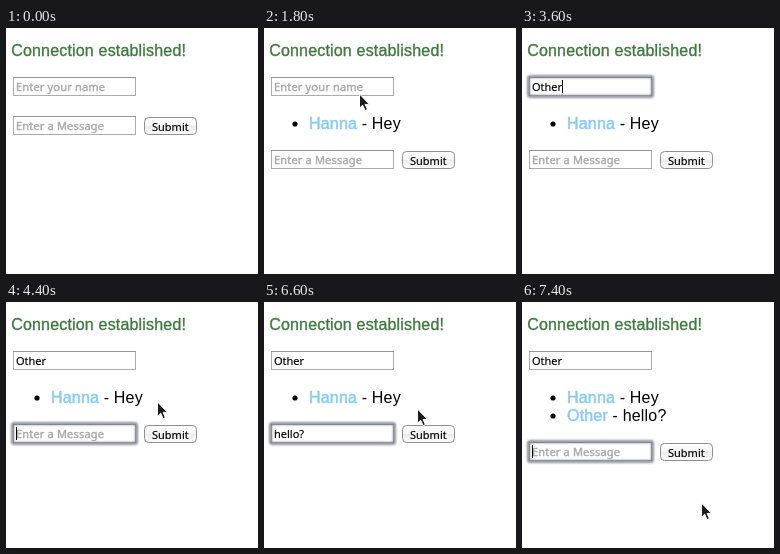
Write an HTML page that moves like this. It is 252 by 246 pixels and loops after 7600 ms.

```html
<!DOCTYPE html>
<html lang="en">
<head>
<meta charset="utf-8">
<title>Chat form</title>
<style>
html, body { margin: 0; width: 100%; height: 100%; overflow: hidden; background: #fff; }
svg { display: block; }
text { white-space: pre; }
.page { font: 16px "Liberation Sans", Arial, sans-serif; letter-spacing: .18px; }
.title { fill: #3f7a3f; stroke: #3f7a3f; stroke-width: .35px; }
.user { fill: #87cbf5; stroke: #87cbf5; stroke-width: .5px; }
.ui { font: 11px "Noto Sans", "Open Sans", sans-serif; stroke: #000; stroke-width: .15px; }
.ui.hint { fill: #a9a9a9; stroke: #a9a9a9; stroke-width: .45px; letter-spacing: .18px; }
.option { font: 13px "Noto Sans", "Open Sans", sans-serif; }
</style>
</head>
<body>
<svg width="252" height="246" viewBox="0 0 252 246">
  <defs>
    <linearGradient id="plain" x2="0" y2="1">
      <stop offset="0" stop-color="#fff"/><stop offset=".5" stop-color="#f4f4f4"/>
      <stop offset=".5" stop-color="#ebebeb"/><stop offset="1" stop-color="#fbfbfb"/>
    </linearGradient>
    <linearGradient id="pressed" x2="0" y2="1">
      <stop offset="0" stop-color="#c3c8d0"/><stop offset="1" stop-color="#969eaa"/>
    </linearGradient>
    <filter id="blur" x="-10%" y="-50%" width="120%" height="200%"><feGaussianBlur stdDeviation=".8"/></filter>
    <g id="field">
      <rect x="7.5" y=".5" width="122" height="18" fill="#fff" stroke="#acacac"/>
      <path d="M7 .5h123" stroke="#969696"/>
    </g>
    <rect id="ring" x="6.5" y="-.5" width="124" height="20" rx="1.5" fill="none" stroke="#7b7f88" stroke-width="2.6" filter="url(#blur)"/>
  </defs>

  <text class="page title" x="5.2" y="28">Connection established!</text>

  <g id="name" transform="translate(0 49)">
    <use href="#field"/><use class="focus" href="#ring"/>
    <text class="ui" x="10" y="14"></text>
    <rect class="caret" y="3" width="1" height="13"/>
  </g>

  <g id="row1" class="page">
    <circle cx="31" cy="96" r="2.6"/>
    <text x="45" y="101"><tspan class="user">Hanna</tspan> - Hey</text>
  </g>
  <g id="row2" class="page">
    <circle cx="31" cy="114" r="2.6"/>
    <text x="45" y="119"><tspan class="user">Other</tspan> - hello?</text>
  </g>

  <g id="form">
    <g id="message">
      <use href="#field"/><use class="focus" href="#ring"/>
      <text class="ui" x="10" y="14"></text>
      <rect class="caret" y="3" width="1" height="13"/>
    </g>
    <rect id="button" x="138.5" y="1.5" width="52" height="17" rx="4" stroke="#8f8f8f"/>
    <text class="ui" x="146" y="15">Submit</text>
    <g id="options">
      <rect id="list" x="7.5" y="19.5" width="122" fill="#fff" stroke="#b8b8b8"/>
      <text class="option" x="11.5" y="37">hello</text>
      <text id="second" class="option" x="11.5" y="61">hey</text>
    </g>
  </g>

  <path id="arrow" d="M0 .5v14.2l3.2-3 2.3 5.4 2.4-1-2.3-5.2h4.4z" fill="#1c1c1c" stroke="#fff"/>
  <path id="beam" d="M-3 -7.5h2l1 1 1-1h2M0 -6.5v13M-3 7.5h2l1-1 1 1h2" fill="none" stroke="#333"/>
</svg>
<script>
const LOOP = 7600, STEP = 100;
const $ = id => document.getElementById(id);

// Each table: [start ms, value...]; a value holds until the next row.
const nameText = [[0, ""], [3200, "O"], [3400, "Ot"], [3500, "Othe"], [3600, "Other"]];
const messageText = [[0, ""], [5100, "h"], [5200, "he"], [5300, "hel"], [5400, "hell"],
  [5600, "hello"], [5800, "hello?"], [7100, ""]];
const focus = [[0, ""], [2600, "name"], [4100, "message"], [6900, ""], [7100, "message"]];
const caretOn = [[0, true], [3000, false], [3200, true], [4600, false], [5100, true],
  [6300, false], [7100, true]];
const formY = [[0, 88], [400, 122], [7100, 140]];
const optionCount = [[0, 0], [5100, 2], [5300, 1], [5800, 0]];
const buttonDown = [[0, false], [6900, true], [7100, false]];
const pointer = [
  [0, ""],
  [1400, "arrow", 202, 82], [1500, "arrow", 150, 80], [1600, "arrow", 88, 77],
  [1700, "arrow", 51, 72], [1800, "arrow", 95, 65],
  [2200, "beam", 92, 64], [2300, "beam", 84, 62], [2400, "beam", 79, 61],
  [3200, ""],
  [4400, "arrow", 151, 99],
  [5100, ""],
  [6300, "arrow", 151, 99], [6400, "arrow", 152, 101], [6500, "arrow", 152, 103],
  [6600, "arrow", 153, 106], [6700, "arrow", 157, 116], [6800, "arrow", 161, 127],
  [6900, "arrow", 162, 132],
  [7100, "arrow", 178, 150], [7200, "arrow", 200, 180], [7300, "arrow", 191, 198],
  [7400, "arrow", 179, 200]
];

const rowAt = (table, t) => table.findLast(row => row[0] <= t);
const at = (table, t) => rowAt(table, t)[1];
const show = (el, on) => el.setAttribute("visibility", on ? "visible" : "hidden");
const move = (el, x, y) => el.setAttribute("transform", `translate(${x} ${y})`);

function drawField(id, value, hint, t) {
  const box = $(id), label = box.querySelector("text"), caret = box.querySelector(".caret");
  const active = at(focus, t) === id;
  label.textContent = value || hint;
  label.classList.toggle("hint", !value);
  show(box.querySelector(".focus"), active);
  show(caret, active && at(caretOn, t));
  caret.setAttribute("x", 10 + (value ? Math.round(label.getComputedTextLength()) : 0));
}

function draw(t) {
  drawField("name", at(nameText, t), "Enter your name", t);
  drawField("message", at(messageText, t), "Enter a Message", t);
  show($("row1"), t >= 400);
  show($("row2"), t >= 7100);
  move($("form"), 0, at(formY, t));
  $("button").setAttribute("fill", at(buttonDown, t) ? "url(#pressed)" : "url(#plain)");

  const count = at(optionCount, t);
  show($("options"), count > 0);
  show($("second"), count > 1);
  $("list").setAttribute("height", 24 * Math.max(count, 1));

  const [, shape, x, y] = rowAt(pointer, t);
  for (const id of ["arrow", "beam"]) {
    show($(id), id === shape);
    if (id === shape) move($(id), x + .5, y + .5);
  }
}

let start, last = -1;
function tick(now) {
  start ??= now;
  const t = Math.floor(((now - start) % LOOP) / STEP) * STEP;
  if (t !== last) draw(last = t);
  requestAnimationFrame(tick);
}
draw(0);
requestAnimationFrame(tick);
</script>
</body>
</html>
```
